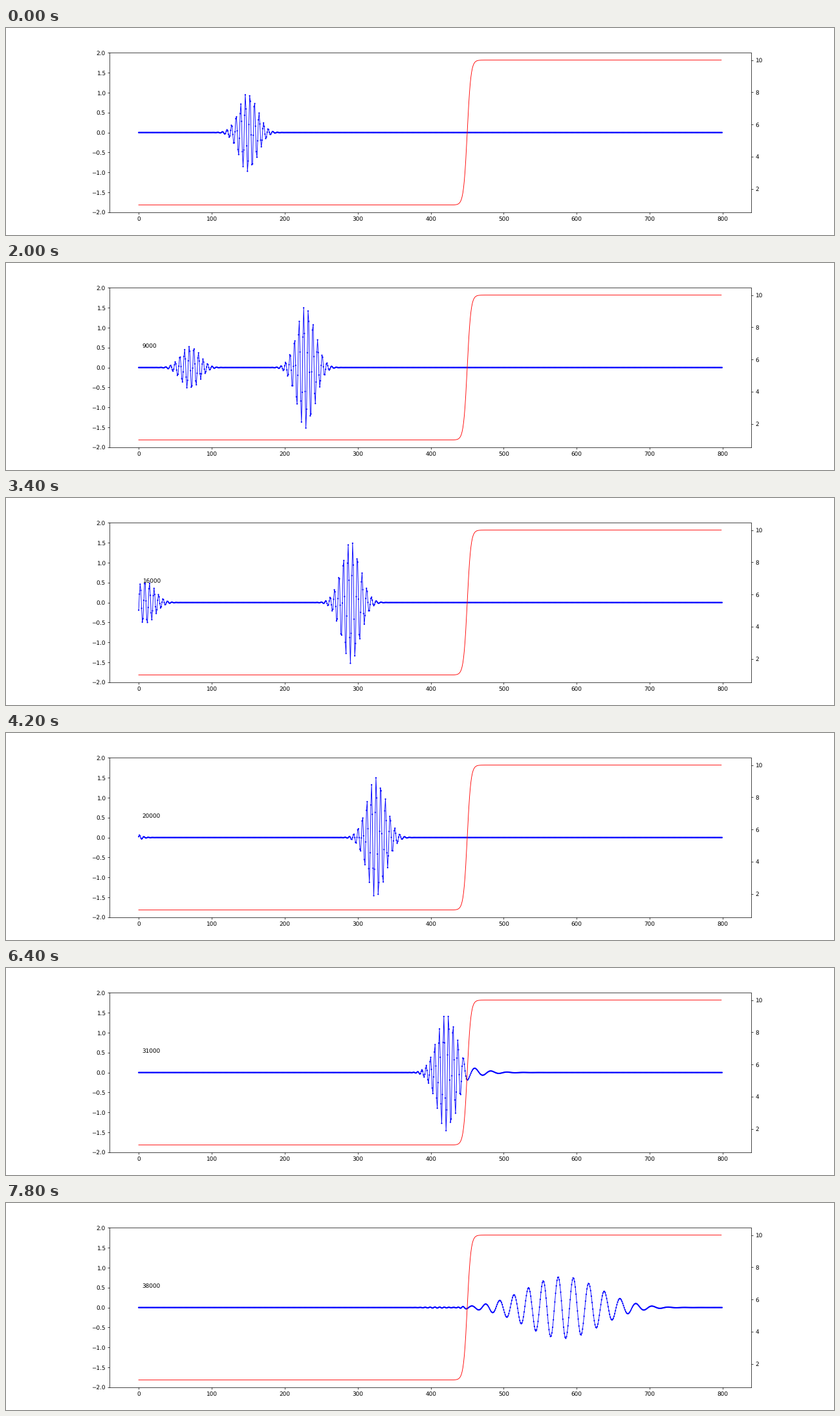
A matplotlib script for the animation above (8000 ms loop, 1280 by 320 pixels).

```python
import numpy as np
import matplotlib.pyplot as plt
from matplotlib.animation import FuncAnimation

POINTS = 800
PAD = 260                 # extra cells on the left so the wave leaves freely
FRAMES = 40
INTERVAL = 200            # ms
STEPS_PER_FRAME = 1000
DT = 0.01
DOT_SIZE = 2.5            # points


def stiffness(x):
    """Spring constant rising smoothly from 1 to 10 around x = 450."""
    return 1 + 4.5 * (1 + np.tanh((x - 450) / 5))


def simulate():
    """Integrate the spring chain and keep one snapshot per frame."""
    x = np.arange(-PAD, POINTS, dtype=float)
    k = stiffness(x[:-1])
    envelope = np.exp(-((x - 150) / (4 * np.pi)) ** 2 / 2)
    u = envelope * np.sin(x)
    v = -2 * envelope * np.cos(x)
    snapshots = [u[PAD:].copy()]
    for _ in range(FRAMES - 2):
        for _ in range(STEPS_PER_FRAME):
            force = k * (u[1:] - u[:-1])
            v[1:-1] += DT * (force[1:] - force[:-1])
            u += DT * v
        snapshots.append(u[PAD:].copy())
    return snapshots


plt.rcParams["text.hinting"] = "none"
snapshots = simulate()
x = np.arange(POINTS)

fig, ax = plt.subplots(figsize=(20, 5), dpi=64)
wave, = ax.plot(x, snapshots[0], "b", lw=1)
# One size per dot keeps their positions exact instead of rounded to pixels.
dots = ax.scatter(x, snapshots[0], s=np.full(POINTS, DOT_SIZE ** 2),
                  c="b", linewidths=0, snap=False)
label = ax.text(5, 0.5, "")
ax.set_ylim(-2, 2)
ax.spines["top"].set_snap(False)

right = ax.twinx()
right.plot(x[:-1], stiffness(x[:-1]), "r", lw=1)
right.spines[:].set_visible(False)


def update(frame):
    step = max(frame - 1, 0)
    wave.set_ydata(snapshots[step])
    dots.set_offsets(np.column_stack([x, snapshots[step]]))
    label.set_text(str(step * STEPS_PER_FRAME) if frame else "")
    return wave, dots, label


anim = FuncAnimation(fig, update, frames=FRAMES, interval=INTERVAL,
                     init_func=lambda: update(0), repeat=True, repeat_delay=0)
plt.show()
```
